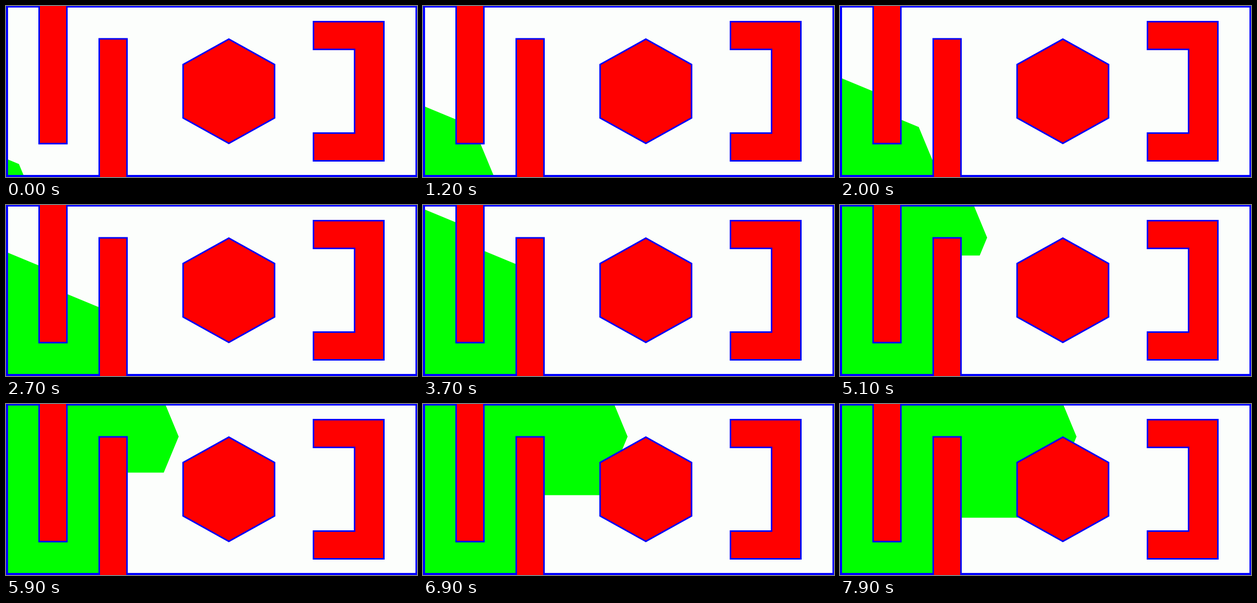
Recreate the animation shown at these times as a matplotlib script. Size 800 px wide and 333 px high, loop 8 s.

```python
import numpy as np
import matplotlib.pyplot as plt
from matplotlib.animation import FuncAnimation
from matplotlib.patches import Polygon

W, H, DPI = 800, 333, 100
FRAMES, INTERVAL = 80, 100
BLUE, RED, PAPER = "#0000ff", "#ff0000", "#fcfefc"
PX = 72 / DPI
MID = 166
T = np.tan(np.pi / 8)

# Start of the wave and the corners it bends around
START, CORNER = (4, 329), (120, 269)
BAR_LEFT, BAR_RIGHT = (181, 63.5), (237, 63.5)


def octagon(x, y, origin):
    """Distance whose unit circle is a regular octagon."""
    dx, dy = np.abs(x - origin[0]), np.abs(y - origin[1])
    return np.maximum(dx, dy) + T * np.minimum(dx, dy)


def distance_field():
    """Shortest way from START to every pixel, around both bars."""
    x, y = np.meshgrid(np.arange(W) + 0.5, np.arange(H) + 0.5)
    d1 = octagon(*CORNER, START)
    d2 = d1 + octagon(*BAR_LEFT, CORNER)
    d3 = d2 + octagon(*BAR_RIGHT, BAR_LEFT)

    # Below the second bar's corner the wave has a flat lower edge
    dx, dy = x - BAR_RIGHT[0], y - BAR_RIGHT[1]
    below = d3 + np.maximum(dx + T * dy, np.sqrt(2) * dy)
    bar_mid = (BAR_LEFT[0] + BAR_RIGHT[0]) / 2
    return np.select(
        [(x >= BAR_LEFT[0]) & (y <= BAR_LEFT[1]),
         x >= bar_mid,
         (x >= 92) & (y < CORNER[1])],
        [d2 + octagon(x, y, BAR_LEFT), below, d1 + octagon(x, y, CORNER)],
        octagon(x, y, START))


def radius(step):
    """Wave radius: steady growth with a few changes of speed."""
    return np.interp(step, [0, 12, 27, 37, 51, 79],
                     [30, 133, 236, 320, 477, 651])


fig = plt.figure(figsize=(W / DPI, H / DPI), dpi=DPI, facecolor=PAPER)
ax = fig.add_axes([0, 0, 1, 1])
ax.axis("off")

field = distance_field()
wave_rgba = np.zeros((H, W, 4))
wave_rgba[..., 1] = 1
wave = ax.imshow(wave_rgba, extent=(0, W, H, 0), aspect="auto",
                 interpolation="nearest", zorder=1)
ax.set(xlim=(0, W), ylim=(H, 0))


def shape(points, fill=RED, width=3, z=3):
    ax.add_patch(Polygon(points, closed=True, fc=fill, ec=BLUE, lw=width * PX,
                         joinstyle="miter", snap=False, zorder=z))


def box(x0, y0, x1, y1, **style):
    shape([(x0, y0), (x1, y0), (x1, y1), (x0, y1)], **style)


def hexagon(cx, cy, half_w, half_h, side):
    shape([(cx, cy - half_h), (cx + half_w, cy - side),
           (cx + half_w, cy + side), (cx, cy + half_h),
           (cx - half_w, cy + side), (cx - half_w, cy - side)])


def bracket(x0, x1, cy, half_h, arm):
    upper = [(x1 - arm - 3, cy - half_h + arm), (x0, cy - half_h + arm),
             (x0, cy - half_h), (x1, cy - half_h)]
    lower = [(x, 2 * cy - y) for x, y in reversed(upper)]
    shape(upper + lower)


box(2, 1, 799, 331, fill="none", width=4, z=2)
box(64.5, -9, 118.5, MID + 102)
box(181.5, MID - 102, 235.5, H + 9)
hexagon(433.75, MID, 89, 101.5, 52)
bracket(598.5, 735.5, MID, 135.5, 54)


def update(step):
    wave_rgba[..., 3] = np.clip(radius(step) - field + 0.5, 0, 1)
    wave.set_data(wave_rgba)
    return wave,


anim = FuncAnimation(fig, update, frames=FRAMES, interval=INTERVAL,
                     repeat=True, repeat_delay=0)
plt.show()
```
